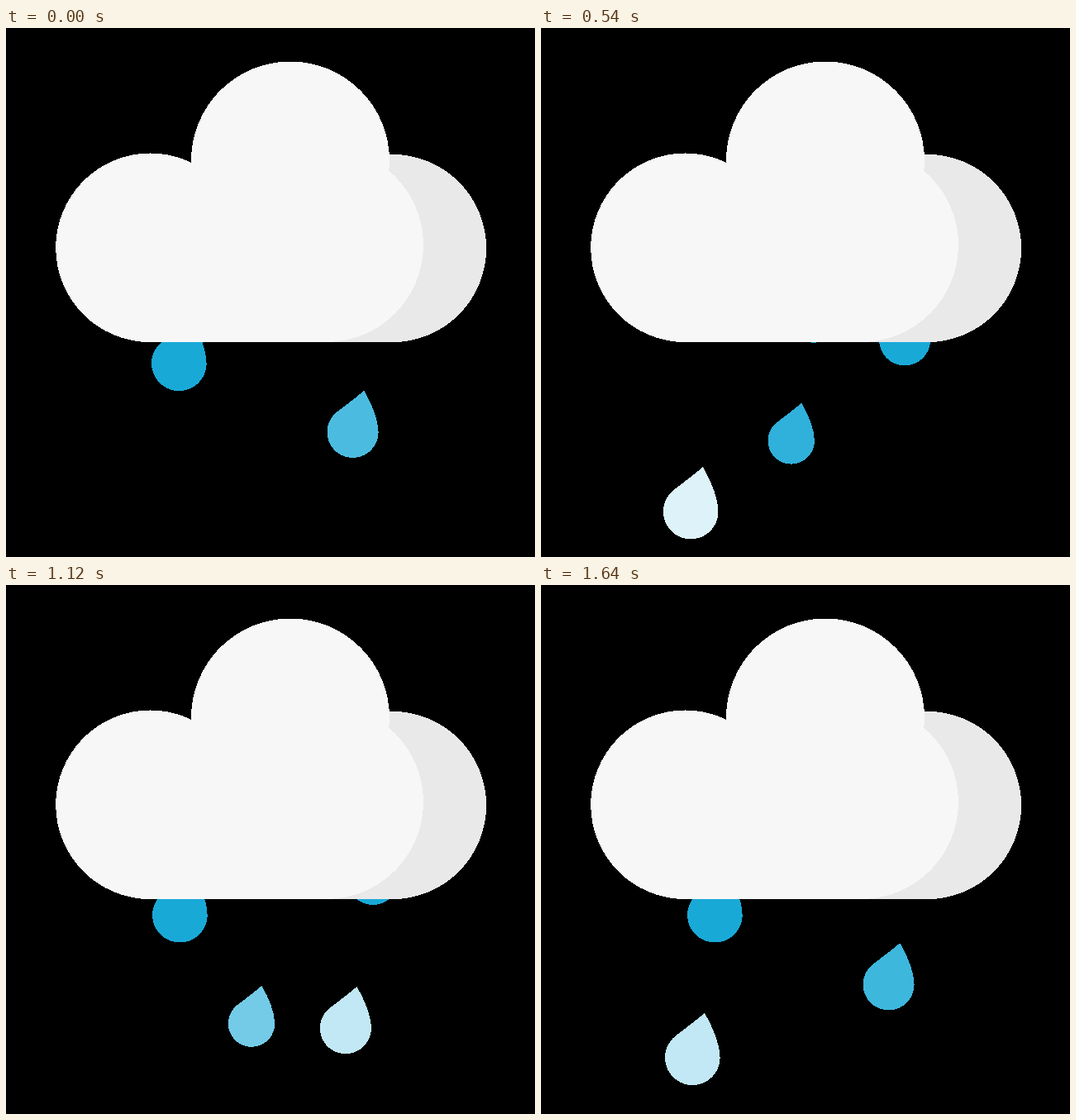
Recreate the animation shown at these times as an HTML page. Size 640 by 640 pixels, loop 1660 ms.

```html
<!DOCTYPE html>
<html lang="en">
<head>
<meta charset="utf-8">
<title>Rain cloud</title>
<style>
  html, body { margin: 0; width: 100%; height: 100%; overflow: hidden; background: #000; }
  svg { display: block; width: 100%; height: 100%; shape-rendering: crispEdges; }
</style>
</head>
<body>
<svg viewBox="0 0 640 640">
  <defs>
    <!-- unit drop: round part has radius 33.3 around the origin -->
    <path id="drop" d="M14.7 -54 C25 -36 33.3 -16 33.3 0 A33.3 33.3 0 1 1 -20.6 -26.2 C-10 -34.5 4 -44.5 14.7 -54Z"/>
  </defs>
  <g id="rain"></g>
  <g fill="#e9e9e9">
    <circle cx="467.5" cy="266.5" r="113.6"/>
    <rect x="300" y="200" width="167.5" height="180"/>
  </g>
  <g fill="#f7f7f7">
    <circle cx="174.5" cy="265.8" r="114.3"/>
    <circle cx="344" cy="160.5" r="120"/>
    <circle cx="387.5" cy="262.5" r="117.5"/>
    <rect x="174.5" y="170" width="213" height="210"/>
  </g>
</svg>
<script>
const LOOP = 1660, STEP = 20;
const RADIUS = 33.3;
const REST = 379;      // lowest point of a drop waiting behind the cloud
const SPEED_UP = 350;  // ms until a drop reaches full speed
const BLUE = [25, 169, 215];

// x: centre at rest, slant: sideways drift per px fallen, speed: px per ms
const kinds = [
  { r: 33.3, x: 218.8, slant: -0.157, speed: 0.332, fade: 624, life: 941, floor: 628, starts: [-356, 784, 1304] },
  { r: 28.2, x: 330.1, slant: -0.184, speed: 0.39, fade: 529, life: 803, floor: 615, starts: [-16, 484] },
  { r: 31, x: 445.5, slant: -0.184, speed: 0.278, fade: 609, life: 942, floor: 592, starts: [-682, 268, 978] }
];

const rain = document.getElementById('rain');
const drops = kinds.flatMap(kind => kind.starts.map(start => {
  const node = document.createElementNS(rain.namespaceURI, 'use');
  node.setAttribute('href', '#drop');
  rain.append(node);
  return { node, kind, start };
}));

// constant acceleration, then constant speed
function fallen(age, speed) {
  return age < SPEED_UP
    ? speed * age * age / (2 * SPEED_UP)
    : speed * (age - SPEED_UP / 2);
}

function drawDrop({ node, kind, start }, time) {
  const age = time - start;
  const visible = age > 0 && age < kind.life;
  node.setAttribute('visibility', visible ? 'visible' : 'hidden');
  if (!visible) return;

  const dy = Math.min(fallen(age, kind.speed), kind.floor - REST);
  const x = kind.x + kind.slant * dy;
  const y = REST + dy - kind.r;
  node.setAttribute('transform', `translate(${x} ${y}) scale(${kind.r / RADIUS})`);

  const pale = Math.max(0, (age - kind.fade) / (kind.life - kind.fade));
  const color = BLUE.map(c => Math.round(c + (255 - c) * pale));
  node.setAttribute('fill', `rgb(${color})`);
}

const begin = performance.now();
function render() {
  const elapsed = (performance.now() - begin) % LOOP;
  const time = Math.floor(elapsed / STEP + 0.001) * STEP;
  drops.forEach(drop => drawDrop(drop, time));
  requestAnimationFrame(render);
}
render();
</script>
</body>
</html>
```
